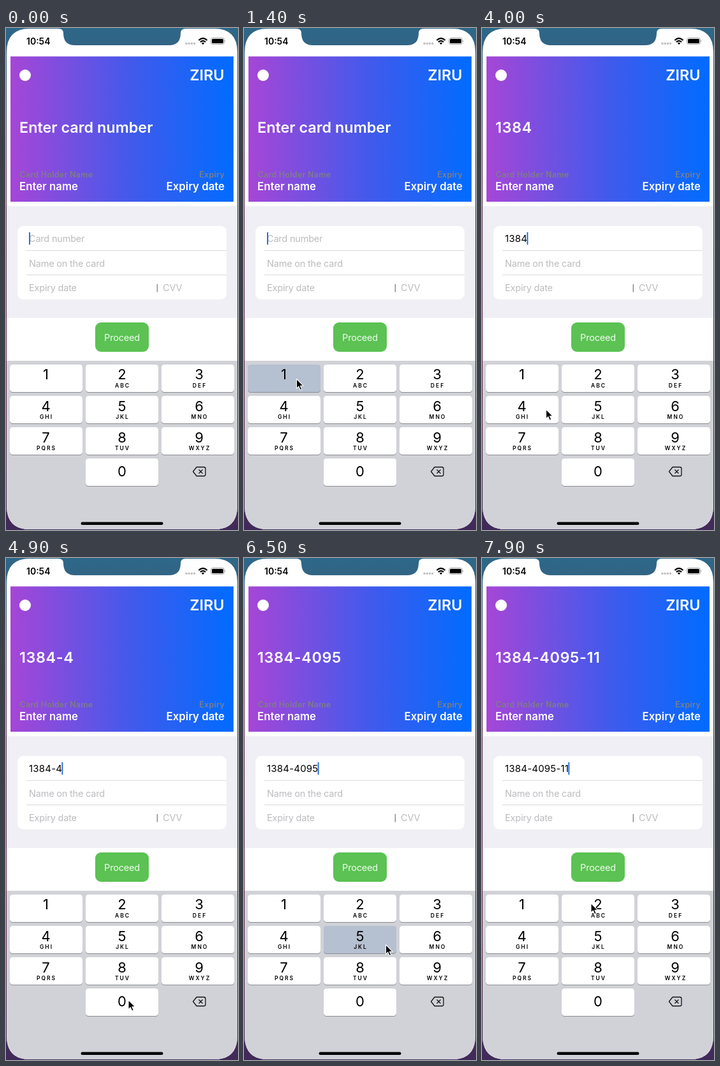
Animation, 364 px wide and 786 px high, one loop 8 s. Source, as an HTML page:

```html
<!DOCTYPE html>
<html lang="en">
<head>
<meta charset="utf-8">
<title>Card form</title>
<style>
html, body { margin: 0; width: 100%; height: 100%; overflow: hidden; }
svg { display: block; width: 100%; height: 100%; font-family: Inter, Roboto, sans-serif; }
.bold { font-weight: 600; fill: #fff; }
.title { font-size: 23.4px; }
.digits { letter-spacing: .6px; }
.label { font-size: 12.5px; letter-spacing: .25px; fill: #7e7e88; }
.value { font-size: 16.8px; }
.end { text-anchor: end; }
.hint { font-size: 14.5px; letter-spacing: -.2px; fill: #bcbcc0; }
.typed { font-size: 15px; letter-spacing: .2px; fill: #000; }
.num { font-size: 22px; text-anchor: middle; }
.abc { font-size: 8.5px; font-weight: 600; letter-spacing: 2px; text-anchor: middle; }
</style>
</head>
<body>
<svg viewBox="0 0 364 786" preserveAspectRatio="none">
  <defs>
    <linearGradient id="wall" x2="0" y2="1">
      <stop offset="0" stop-color="#2d6889"/>
      <stop offset=".05" stop-color="#346282"/>
      <stop offset=".3" stop-color="#653a5c"/>
      <stop offset=".8" stop-color="#5c2a50"/>
      <stop offset="1" stop-color="#402a5a"/>
    </linearGradient>
    <linearGradient id="card">
      <stop offset="0" stop-color="#a646d6"/>
      <stop offset=".55" stop-color="#405aec"/>
      <stop offset="1" stop-color="#006cff"/>
    </linearGradient>
    <clipPath id="screen">
      <path d="M37 1H82Q90 1 90 8Q90 27 108 27H256Q274 27 274 8Q274 1 282 1H327Q363 1 363 38V748Q363 785 327 785H37Q1 785 1 748V38Q1 1 37 1Z"/>
    </clipPath>
  </defs>
  <rect width="364" height="786" fill="url(#wall)"/>
  <g clip-path="url(#screen)">
    <rect width="364" height="786" fill="#fff"/>

    <!-- status bar -->
    <text x="32" y="26" font-size="14" font-weight="600">10:54</text>
    <path d="M281.5 24.2H297" stroke="#bdbdbd" stroke-width="3" stroke-dasharray="3 1.2"/>
    <g fill="none" stroke="#000" stroke-width="2.2">
      <path d="M302.4 19.2Q309 13.2 315.600 19.2M304.900 21.900Q309 18.200 313.100 21.900"/>
      <path d="M309 26L306.800 23.700Q309 22 311.200 23.700Z" fill="#000" stroke="none"/>
    </g>
    <rect x="321.500" y="15.500" width="21" height="10" rx="3" fill="none" stroke="#a0a0a0"/>
    <rect x="323" y="17" width="18" height="7" rx="1.600"/>
    <path d="M343.500 18.800Q345.500 20.500 343.500 22.200Z" fill="#a0a0a0"/>

    <!-- card -->
    <rect x="7" y="44.500" width="350" height="227.500" fill="url(#card)"/>
    <circle cx="30" cy="74" r="9" fill="#fff"/>
    <text class="bold title end" x="342.500" y="82">ZIRU</text>
    <text class="bold title" id="number" x="21" y="163.500"></text>
    <text class="bold label" x="21.500" y="234">Card Holder Name</text>
    <text class="bold label end" x="343" y="234">Expiry</text>
    <text class="bold value" x="21" y="254">Enter name</text>
    <text class="bold value end" x="343" y="254">Expiry date</text>

    <!-- form -->
    <rect y="279" width="364" height="175" fill="#efeff5"/>
    <rect x="18" y="310" width="328" height="115" rx="9" fill="#fff"/>
    <path d="M32 348.500H346M32 386.500H346" stroke="#dadadd"/>
    <text id="entry" x="36" y="335"></text>
    <text class="hint" x="36" y="373.500">Name on the card</text>
    <text class="hint" x="36" y="412">Expiry date</text>
    <path d="M237.300 401V413.500" stroke="#777" stroke-width="1.200"/>
    <text class="hint" x="246" y="412">CVV</text>
    <rect id="caret" y="319.500" width="2" height="20" rx="1" fill="#2a70e0"/>
    <rect x="140" y="461" width="84" height="46" rx="9" fill="#5bc253"/>
    <text class="hint" x="182" y="490" text-anchor="middle" style="fill:#effaee">Proceed</text>

    <!-- keyboard -->
    <rect y="521" width="364" height="265" fill="#d1d2d7"/>
    <g id="keys"></g>
    <path d="M299 687.500H310.500Q313 687.500 313 690V699Q313 701.500 310.500 701.500H299L293.500 694.500ZM302.500 691.500L308.500 697.500M308.500 691.500L302.500 697.500" fill="none" stroke="#111" stroke-width="1.300" stroke-linejoin="round"/>
    <rect x="117.500" y="773.500" width="129" height="4.500" rx="2.250"/>
  </g>
  <path id="pointer" d="M0 0V14.800L3.300 11.700L5.700 17.200L8.200 16.100L5.900 10.700H10.500Z" stroke="#fff" stroke-width="1.100" stroke-linejoin="round"/>
</svg>
<script>
const LOOP = 8000, STEP = 100;
const byId = id => document.getElementById(id);
const number = byId('number'), entry = byId('entry'), caret = byId('caret'), pointer = byId('pointer');

// Each tap: key, press time, time its digit appears, release time
const taps = [
  ['1', 1300, 1500, 1500], ['3', 2300, 2400, 2500], ['8', 3000, 3100, 3200],
  ['4', 3600, 3700, 3800], ['4', 4300, 4400, 4500], ['0', 5000, 5100, 5200],
  ['9', 5600, 5700, 5800], ['5', 6300, 6400, 6600], ['1', 7000, 7100, 7200],
  ['1', 7300, 7400, 7500]
];

// Pointer stops: time, x, y
const stops = [
  [500, -12, 600], [1100, 82.5, 549.5], [1600, 82.5, 549.5], [2200, 288, 552],
  [2500, 288, 552], [2900, 201.5, 625.5], [3200, 202, 638], [3600, 100.5, 597],
  [4500, 100.5, 597], [4900, 192, 692], [5200, 192, 692], [5500, 268, 645],
  [5800, 268, 645], [6200, 222.5, 605.5], [6600, 222.5, 605.5],
  [6900, 84, 548], [7500, 84, 548], [7900, 171, 540.5]
];

const letters = ['', 'ABC', 'DEF', 'GHI', 'JKL', 'MNO', 'PQRS', 'TUV', 'WXYZ'];
const keys = {};

function addKey(name, col, row, sub = '') {
  const x = 6 + col * 119, y = 527 + row * 49;
  const mid = [62.5, 182, 303][col];
  const base = row === 3 ? 702 : 550 + row * 49.5;
  byId('keys').insertAdjacentHTML('beforeend',
    `<rect x="${x}" y="${y + 1}" width="114" height="43" rx="4.5" fill="#8c8d91"/>
     <rect id="key${name}" x="${x}" y="${y}" width="114" height="43" rx="4.5"/>
     <text class="num" x="${mid}" y="${base}">${name}</text>
     <text class="abc" x="${mid + 1}" y="${562.5 + row * 49}">${sub}</text>`);
  keys[name] = byId('key' + name);
}
letters.forEach((sub, i) => addKey(String(i + 1), i % 3, Math.floor(i / 3), sub));
addKey('0', 1, 3);

function pointerAt(t) {
  const next = stops.findIndex(s => s[0] >= t);
  if (next < 1) return stops[next < 0 ? stops.length - 1 : 0].slice(1);
  const [t0, x0, y0] = stops[next - 1], [t1, x1, y1] = stops[next];
  const p = (t - t0) / (t1 - t0), e = p * p * (3 - 2 * p);
  return [x0 + (x1 - x0) * e, y0 + (y1 - y0) * e];
}

function draw(t) {
  const digits = taps.filter(tap => t >= tap[2]).map(tap => tap[0]).join('');
  const text = digits.replace(/(.{4})(?=.)/g, '$1-');
  number.textContent = text || 'Enter card number';
  number.setAttribute('class', 'bold title' + (text ? ' digits' : ''));
  entry.textContent = text || 'Card number';
  entry.setAttribute('class', text ? 'typed' : 'hint');
  caret.setAttribute('x', 36 + (text ? entry.getComputedTextLength() - .8 : 0));

  for (const name in keys) {
    const down = taps.some(tap => tap[0] === name && t >= tap[1] && t < tap[3]);
    keys[name].setAttribute('fill', down ? '#b5c0d0' : '#fff');
  }
  pointer.setAttribute('transform', `translate(${pointerAt(t)})`);
}

const start = performance.now();
function tick() {
  const t = (performance.now() - start) % LOOP;
  draw(Math.floor(t / STEP) * STEP);
  requestAnimationFrame(tick);
}
tick();
</script>
</body>
</html>
```
